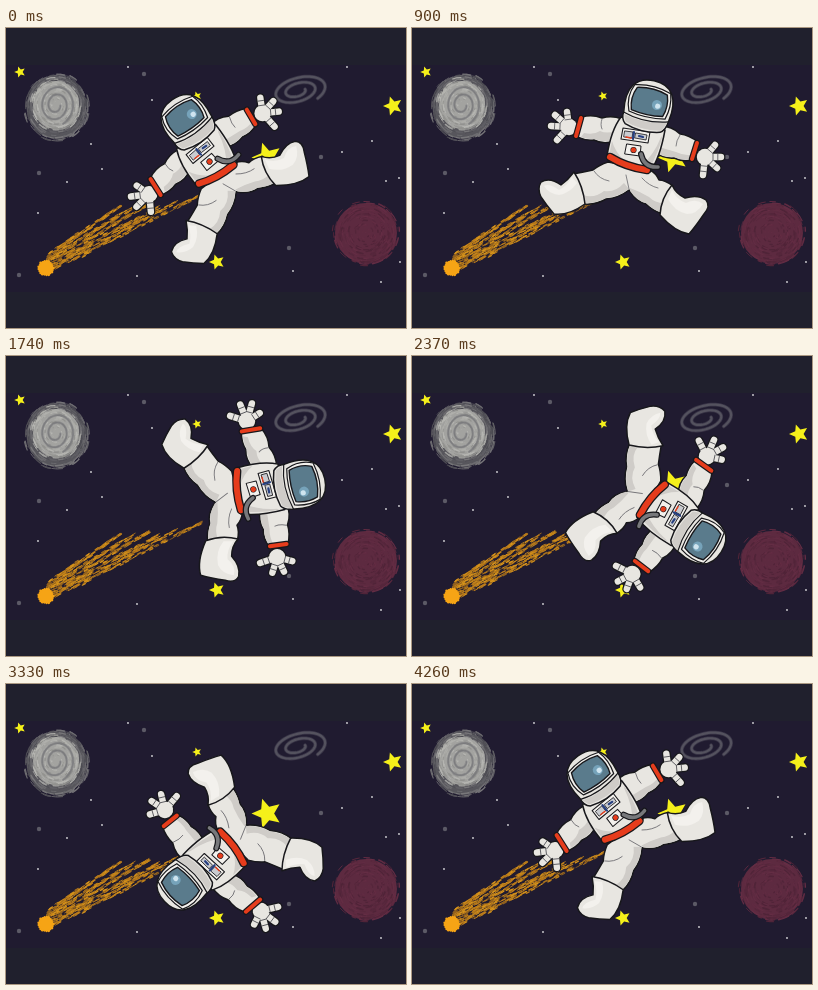
An HTML page with a canvas that plays this animation: 400 by 300 pixels, repeating every 4380 ms.

```html
<!DOCTYPE html>
<html lang="en">
<head>
<meta charset="utf-8">
<title>Spinning astronaut</title>
<style>
html, body { margin: 0; width: 100%; height: 100%; overflow: hidden; background: #20202d; }
canvas { display: block; width: 400px; height: 300px; }
</style>
</head>
<body>
<canvas id="stage" width="400" height="300"></canvas>
<script>
const LOOP = 4380;
const CENTER = [225.5, 148];
// [start of a run, step length] in ms
const RUNS = [[0, 150], [300, 120], [2220, 150], [2370, 120], [3900, 120]];
// [time in ms, angle in degrees from upright]
const SPIN = [[0, -48], [900, 0], [1740, 65], [2370, 110], [2730, 152], [3330, 214], [4260, 312]];

const ctx = document.getElementById('stage').getContext('2d');
const sky = document.createElement('canvas');
sky.width = 400;
sky.height = 300;

let seed = 7;
function random() {
  seed = (seed * 16807) % 2147483647;
  return seed / 2147483647;
}
const spread = size => (random() - 0.5) * size;

function disc(g, x, y, r, color) {
  g.fillStyle = color;
  g.beginPath();
  g.arc(x, y, r, 0, 7);
  g.fill();
}

function star(g, x, y, r) {
  g.fillStyle = '#f5f01a';
  g.beginPath();
  for (let i = 0; i < 10; i++) {
    const a = i * Math.PI / 5 - Math.PI / 2 - 0.32;
    const d = i % 2 ? r * 0.46 : r;
    g.lineTo(x + d * Math.cos(a), y + d * Math.sin(a));
  }
  g.fill();
}

// Oval of short chalk arcs over a flat base
function chalkOval(g, x, y, rx, ry, base, tones) {
  g.fillStyle = base;
  g.beginPath();
  g.ellipse(x, y, rx - 2, ry - 2, 0, 0, 7);
  g.fill();
  for (let i = 0; i < 320; i++) {
    const d = Math.sqrt(random()), a = random() * 7;
    g.strokeStyle = tones[i % tones.length];
    g.lineWidth = 0.6 + random();
    g.beginPath();
    g.ellipse(x + spread(3), y + spread(3), rx * d, ry * d, 0, a, a + 0.1 + random() * 0.25);
    g.stroke();
  }
}

// Soft double-turn spiral
function swirl(g, x, y, rx, ry, tilt, color, width) {
  g.strokeStyle = color;
  for (const [w, alpha] of [[width * 1.7, 0.4], [width, 0.7]]) {
    g.lineWidth = w;
    g.globalAlpha = alpha;
    g.beginPath();
    for (let a = 0; a < 13.5; a += 0.1) {
      const d = 0.25 + 0.75 * a / 13.5, u = rx * d * Math.cos(a), v = ry * d * Math.sin(a);
      g.lineTo(x + u * Math.cos(tilt) - v * Math.sin(tilt), y + u * Math.sin(tilt) + v * Math.cos(tilt));
    }
    g.stroke();
  }
  g.globalAlpha = 1;
}

function paintSky(g) {
  g.lineCap = 'round';
  g.fillStyle = '#20202d';
  g.fillRect(0, 0, 400, 300);
  g.fillStyle = '#201b30';
  g.fillRect(0, 37, 400, 227);

  const dots = [32,57, 122,39, 146,72, 85,116, 96,141, 61,154, 32,185, 131,248,
    341,39, 336,124, 366,113, 393,150, 380,153, 287,243, 375,254, 394,234];
  for (let i = 0; i < dots.length; i += 2) disc(g, dots[i], dots[i + 1], 0.9, '#d8d8dc');
  for (const [x, y] of [[33, 145], [13, 247], [283, 220], [138, 46], [315, 129]]) disc(g, x, y, 2.2, '#5c5a66');

  chalkOval(g, 50.5, 79, 32, 34, '#57565c', ['#6d6c70', '#4d4c53', '#78777a', '#605f65']);
  chalkOval(g, 50, 77, 25, 26, '#a3a3a0', ['#b5b5b1', '#a0a09e', '#92928f', '#acaca8']);
  swirl(g, 50, 77, 18, 21, 0.2, '#77777a', 1.5);
  chalkOval(g, 360, 205, 33, 32, '#5d2a40', ['#642d44', '#56273c', '#602b42', '#502438']);
  swirl(g, 292, 63, 29, 15, -0.25, '#605e69', 2.2);

  // Comet tail: grains fanning out of the head in six bands
  const tips = [[113, 179], [126, 180], [141, 177], [152, 180], [169, 175], [195, 167]];
  const tones = ['#b97a1b', '#d8951c', '#c48419', '#94631e'];
  for (let i = 0; i < 850; i++) {
    const band = i % 6, [x, y] = tips[band];
    const sx = 40 + band * 1.5 + spread(3), sy = 229 + band * 2.4 + spread(4);
    const k = random(), len = 3 / (x - sx);
    const jx = spread(2), jy = spread(3);
    g.strokeStyle = tones[(random() * 4) | 0];
    g.lineWidth = 0.7 + random() * 0.6;
    g.beginPath();
    g.moveTo(sx + (x - sx) * k + jx, sy + (y - sy) * k + jy);
    g.lineTo(sx + (x - sx) * (k + len) + jx, sy + (y - sy) * (k + len) + jy);
    g.stroke();
  }
  disc(g, 40, 240, 7.5, '#f6a415');
  for (let a = 0; a < 6.3; a += 0.3) disc(g, 40 + 7.3 * Math.cos(a), 240 + 7.3 * Math.sin(a), 0.5 + random(), '#f6a415');

  star(g, 14, 44, 5.8);
  star(g, 191, 68, 4.8);
  star(g, 387, 78, 10);
  star(g, 211, 234, 8);
  star(g, 261, 129.5, 15.5);
}

function shape(d, fill, line = 1.5) {
  const p = new Path2D(d);
  ctx.fillStyle = fill;
  ctx.fill(p);
  if (line) {
    ctx.strokeStyle = INK;
    ctx.lineWidth = line;
    ctx.stroke(p);
  }
}

function stroke(d, color, width) {
  ctx.strokeStyle = color;
  ctx.lineWidth = width;
  ctx.stroke(new Path2D(d));
}

const INK = '#17171b', SUIT = '#e8e6e1', SHADE = '#cfccc8', LIGHT = '#f3f1ed', RED = '#e63c1c';

function hand(x, y, tips) {
  const fingers = tips.map(([u, v]) => `M${x} ${y}L${u} ${v}`).join('');
  stroke(fingers, INK, 9);
  disc(ctx, x, y, 9.5, INK);
  stroke(fingers, SUIT, 6.4);
  disc(ctx, x, y, 8.2, SUIT);
  for (const [u, v] of tips) {
    const a = Math.atan2(v - y, u - x), px = 3 * Math.sin(a), py = -3 * Math.cos(a);
    for (const k of [0.5, 0.8]) {
      const mx = x + (u - x) * k, my = y + (v - y) * k;
      stroke(`M${mx + px} ${my + py}L${mx - px} ${my - py}`, '#4a4a50', 0.8);
    }
  }
}

function cuff(d) {
  stroke(d, INK, 6.4);
  stroke(d, RED, 4);
}

function astronaut() {
  ctx.lineCap = ctx.lineJoin = 'round';

  hand(157, 99, [[155, 84], [143, 87], [139, 98], [145, 112]]);
  hand(293, 129, [[303, 117], [309, 129], [305, 140], [291, 147]]);

  // Arms
  shape('M210 91Q200 87 190 90Q180 86 170 89L165 109Q174 113 182 112Q192 117 202 113Z', SUIT);
  shape('M172 105Q182 107 188 103Q195 106 203 103L201 112Q192 115 182 111Q174 111 169 109Z', SHADE, 0);
  shape('M248 98Q260 98 268 106Q277 107 286 114L280 132Q270 134 262 130Q252 131 242 124Z', SUIT);
  shape('M247 119Q257 122 264 124Q272 128 281 127L279 131Q270 133 262 129Q252 130 245 124Z', SHADE, 0);
  stroke('M190 91Q188 97 190 101M268 107Q264 113 264 118', '#77767a', 0.9);
  cuff('M169 90L164 108');
  cuff('M285 115L280 131');

  // Legs and boots
  shape('M196 134Q187 137 181 142Q172 144 161 146L172 176Q184 177 194 171Q207 170 217 162Q224 174 234 176Q240 182 248 185L261 158Q253 152 247 152Q244 145 238 142Z', SUIT);
  shape('M171 167Q182 171 192 163Q203 165 212 155L217 161Q206 169 194 170Q183 176 172 175Z', SHADE, 0);
  shape('M218 160Q229 164 237 169Q243 175 252 175L248 184Q240 181 234 175Q225 173 218 163Z', SHADE, 0);
  stroke('M182 143Q187 151 197 153M230 150Q237 158 246 160M214 147L217 161', '#77767a', 0.9);
  shape('M162 144Q156 152 149 157Q138 149 129 154Q125 161 129 169Q135 178 142 186Q156 188 173 176Q171 158 162 144Z', SUIT);
  shape('M160 149Q155 158 147 162Q137 155 132 158Q137 166 147 167Q158 165 165 155Z', LIGHT, 0);
  shape('M260 157Q264 166 273 170Q286 166 294 172Q299 178 292 186Q284 198 277 206Q263 204 248 187Q249 170 260 157Z', SUIT);
  shape('M260 162Q265 172 274 175Q284 170 291 176Q285 186 275 186Q262 183 256 171Z', LIGHT, 0);

  // Torso
  shape('M209 89Q199 102 195 128Q214 141 238 144Q248 130 253 102Q236 90 209 89Z', SUIT);
  shape('M200 113Q203 124 213 133L197 128Z', SHADE, 0);
  shape('M249 109Q242 127 229 138L237 141Q246 126 251 107Z', SHADE, 0);
  stroke('M198 129Q214 139 235 142', INK, 8.6);
  stroke('M198 129Q214 139 235 142', RED, 6);

  // Chest panels and hose
  shape('M211 100L238 104L236 115L209 111Z', LIGHT, 1.1);
  shape('M213 103L221 104L220 110L212 109Z', '#c9cbd0', 0.8);
  stroke('M214 109L219 110', RED, 1.4);
  shape('M224 105L235 107L234 112L223 110Z', '#c9cbd0', 0.8);
  stroke('M222 104L221 111M227 108L231 109', '#263f80', 2.2);
  shape('M215 116L229 118L228 128L213 126Z', LIGHT, 1);
  disc(ctx, 221.5, 122, 3.1, INK);
  disc(ctx, 221.5, 122, 2.5, RED);
  stroke('M229 126Q232 140 246 139', INK, 6);
  stroke('M229 126Q232 140 246 139', '#77787b', 3.6);

  // Helmet
  ctx.save();
  ctx.translate(235.5, 78);
  ctx.rotate(0.22);
  shape('M-22 10C-26 -14 -17 -26 1 -26C20 -26 28 -13 24 10Q23 20 18 23Q0 28 -18 22Q-23 18 -22 10Z', SUIT);
  shape('M-21 13Q0 19 23 12L19 21Q0 26 -18 20Z', SHADE, 0);
  stroke('M-22 11Q0 18 24 11', INK, 1.2);
  shape('M-17 -18Q2 -23 20 -17Q24 -5 20 9Q1 13 -17 9Q-23 -5 -17 -18Z', LIGHT, 1.2);
  shape('M-14 -16Q2 -20 17 -15Q21 -4 17 7Q1 10 -15 7Q-19 -5 -14 -16Z', '#5a7b8c', 1.4);
  disc(ctx, 9, -3, 5, '#76a3ba');
  disc(ctx, 10, -2, 2.6, '#cfe4ef');
  ctx.restore();
}

function frameTime(t) {
  const [start, step] = RUNS.filter(run => run[0] <= t).pop();
  return start + Math.floor((t - start) / step) * step;
}

function angleAt(t) {
  let i = 1;
  while (i < SPIN.length - 1 && SPIN[i][0] < t) i++;
  const [t0, a0] = SPIN[i - 1], [t1, a1] = SPIN[i];
  return (a0 + (a1 - a0) * (t - t0) / (t1 - t0)) * Math.PI / 180;
}

function draw() {
  const t = frameTime(performance.now() % LOOP);
  ctx.drawImage(sky, 0, 0);
  ctx.save();
  ctx.translate(...CENTER);
  ctx.rotate(angleAt(t));
  ctx.translate(-CENTER[0], -CENTER[1]);
  astronaut();
  ctx.restore();
  requestAnimationFrame(draw);
}

paintSky(sky.getContext('2d'));
draw();
</script>
</body>
</html>
```
